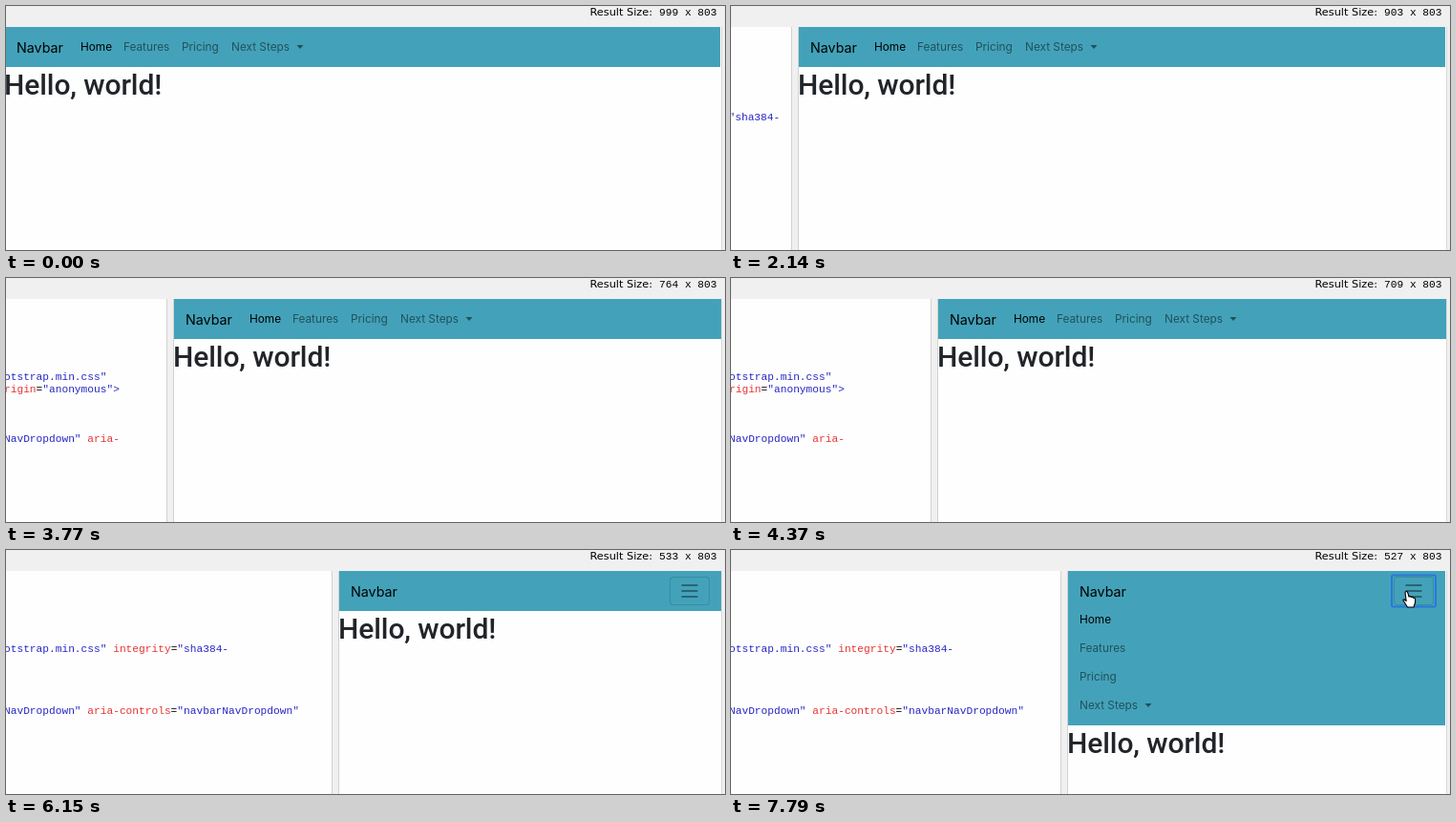
An HTML page that plays this animation: 753x256 px, repeating every 8000 ms.

```html
<!DOCTYPE html>
<html lang="en">
<head>
<meta charset="utf-8">
<title>Responsive navbar</title>
<style>
  html, body { margin: 0; width: 100%; height: 100%; overflow: hidden; background: #fefefe; }
  svg { display: block; }
  #stage { width: 753px; height: 256px; }
  .label { font: 11.3px "DejaVu Sans", sans-serif; }
  .mono { font: 11.2px "Liberation Mono", monospace; }
  .brand { font: 14.3px Inter, sans-serif; }
  .link { font: 11.8px Inter, sans-serif; }
  .dim { opacity: .5; }
  h1, .title { font: 500 30px Roboto, sans-serif; letter-spacing: -.1px; fill: #212529; }
  .s { fill: #2727c4; }
  .a { fill: #e53434; }
</style>
</head>
<body>
<svg id="stage" viewBox="0 0 753 256">
  <rect width="753" height="256" fill="#fefefe"/>
  <g id="code" class="mono"></g>
  <g id="gap">
    <rect x="-8" y="22" width="8" height="234" fill="#d2d2d2"/>
    <rect x="-7" y="22" width="6" height="234" fill="#f0f0f0"/>
  </g>
  <rect width="753" height="22" fill="#f0f0f0"/>
  <rect x="749" y="22" width="1" height="234" fill="#d8d8d8"/>
  <rect x="750" y="22" width="3" height="234" fill="#f0f0f0"/>
  <text class="label" x="611.5" y="10">Result Size:</text>
  <text class="mono" id="size" x="744.5" y="10" text-anchor="end"></text>
  <svg id="nav" y="22">
    <rect width="100%" height="100%" fill="#43a2b9"/>
    <text class="brand" x="12" y="27">Navbar</text>
    <g id="links">
      <text class="link">Home</text>
      <text class="link dim">Features</text>
      <text class="link dim">Pricing</text>
      <g class="dim"><text class="link">Next Steps</text><path d="M68.5-6h7l-3.5 4z"/></g>
    </g>
    <g id="toggler" fill="none" stroke="#000">
      <rect x=".5" y=".5" width="41" height="29" rx="3" stroke-opacity=".14"/>
      <path d="M12.5 9h17m-17 6h17m-17 6h17" stroke-width="1.5" stroke-opacity=".5"/>
      <rect id="ring" x="-2" y="-1.5" width="46" height="33" rx="1.5" stroke="#2878dc" stroke-width="2"/>
    </g>
  </svg>
  <text class="title" id="title"></text>
  <path id="hand" fill="#fff" stroke="#000" stroke-width="1.1" stroke-linejoin="round"
    d="M2 1.5Q3.5-.5 4.7 1.5L6 6Q7.5 5 8.3 6.5Q9.8 5.8 10.5 7.2Q12.5 6.8 12.6 9V12L11 17H4.5L1 11.5Q-1 9 .8 8.8L3.2 10.5z"/>
</svg>
<script>
const $ = id => document.getElementById(id);
const LOOP = 8000, START = 496, STEP = 148.6;

// [step, width of the result pane in CSS pixels, shown at 75 %]
const widths = [[-1, 999], [6, 945], [16, 861], [19, 813], [20, 813], [22, 764],
  [30, 654], [31, 654], [38, 533], [39, 528], [40, 527]];
const linkX = [79, 124, 185, 237];

// [x, baseline, smallest and largest wrap width at which it shows, markup]
const str = t => `<tspan class="s">${t}</tspan>`;
const attr = t => `<tspan class="a">${t}</tspan>`;
const code = [
  [-2.5, 120, 51, 105, str('"sha384-')],
  [-2, 185, 78, 105, str('NavDropdown"')],
  [-2, 172, 105, 999, str('NavDropdown"')],
  [-2, 107, 105, 999, str('otstrap.min.css"')],
  [-2, 120, 119, 233, attr('rigin') + '=' + str('"anonymous"&gt;')],
  [85.3, 172, 119, 999, attr('aria-')],
  [112.2, 107, 233, 999, attr('integrity') + '=' + str('"sha384-')],
  [118.9, 172, 307, 999, attr('controls') + '=' + str('"navbarNavDropdown"')],
];
$('code').innerHTML = code.map(([x, y, , , t]) => `<text x="${x}" y="${y}">${t}</text>`).join('');
$('title').textContent = 'Hello, world!';

const clamp = v => Math.max(0, Math.min(1, v));
const show = (el, on) => el.setAttribute('visibility', on ? 'inherit' : 'hidden');
const move = (el, x, y) => el.setAttribute('transform', `translate(${x} ${y})`);

function widthAt(step) {
  const i = widths.findIndex(k => k[0] >= step);
  if (i < 0) return widths[widths.length - 1][1];
  if (i === 0) return widths[0][1];
  const [[s0, w0], [s1, w1]] = [widths[i - 1], widths[i]];
  return Math.round(w0 + (w1 - w0) * (step - s0) / (s1 - s0));
}

function draw(time) {
  const step = Math.max(-1, Math.floor((time - START) / STEP));
  const w = widthAt(step);
  const x = Math.floor(749 - w * .75);
  const navW = Math.round(w * .75);
  const narrow = w < 576;
  const p = clamp((step - 45) / 3);
  const grow = 120 * p * p * (3 - 2 * p);

  $('size').textContent = `${w} x 803`;
  move($('gap'), x, 0);
  [...$('code').children].forEach((el, i) => {
    const [, , min, max] = code[i], wrap = x - 19;
    show(el, wrap >= min && wrap < max);
  });

  const nav = $('nav');
  nav.setAttribute('x', x);
  nav.setAttribute('width', navW);
  nav.setAttribute('height', 42 + grow);
  [...$('links').children].forEach((el, i) => {
    move(el, narrow ? 12 : linkX[i], narrow ? 55 + 30 * i : 25);
    show(el, !narrow || grow > 0);
  });
  show($('toggler'), narrow);
  move($('toggler'), navW - 54, 6);
  show($('ring'), narrow && step >= 45);

  const title = $('title');
  title.setAttribute('x', x - 1);
  title.setAttribute('y', 93 + grow);

  const far = 1 - clamp((step - 43) / 2);
  show($('hand'), step >= 43);
  move($('hand'), 704 - 4 * far, 43 + 8 * far);
}

function tick() {
  draw(performance.now() % LOOP);
  requestAnimationFrame(tick);
}
tick();
</script>
</body>
</html>
```
